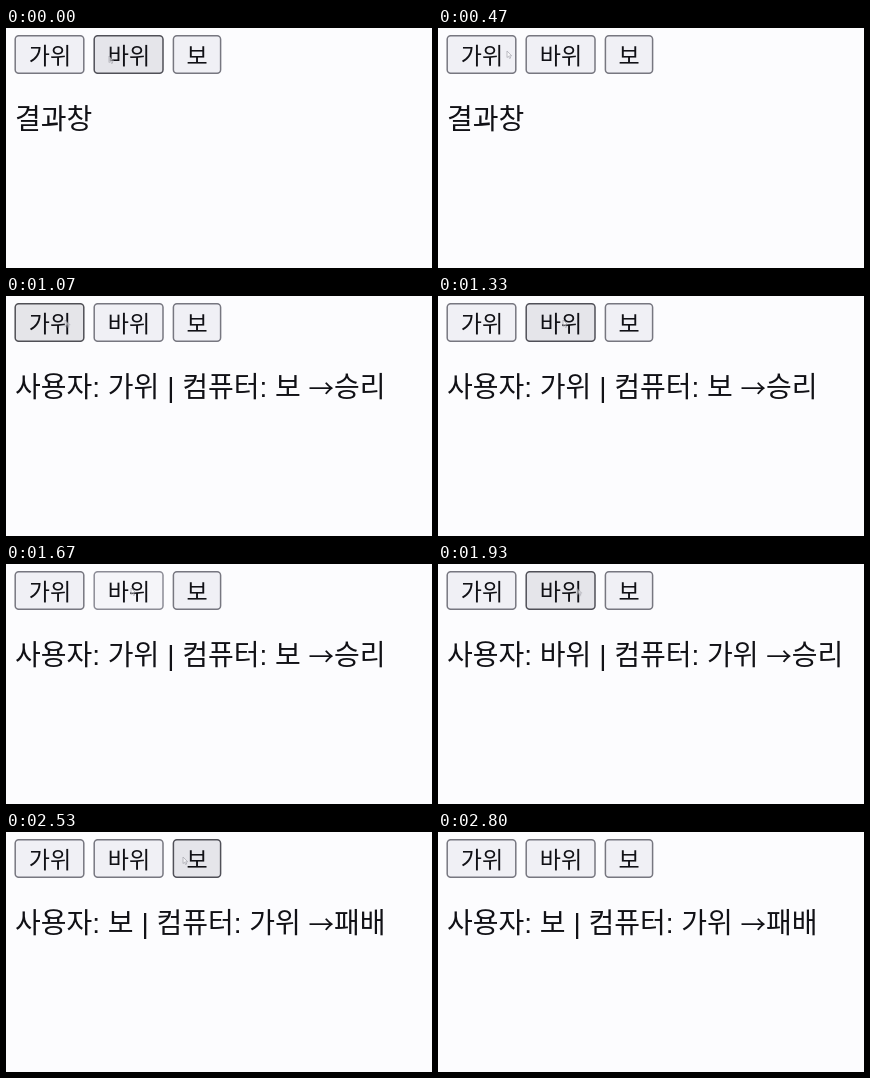
Recreate the animation shown at these times as an HTML page. Size 426 by 240 pixels, loop 2870 ms.

```html
<!DOCTYPE html>
<html lang="ko">
<head>
<meta charset="utf-8">
<title>가위바위보</title>
<style>
  html, body { margin: 0; width: 100%; height: 100%; overflow: hidden; background: #fcfcfe; }
  svg { display: block; width: 426px; height: 240px; }
  text { font-family: "Liberation Sans", "Noto Sans CJK KR", "Noto Sans CJK", sans-serif; fill: #111116; }
  rect { fill: #f0f0f5; stroke: #777780; stroke-width: 1.5; }
  .label { font-size: 23px; text-anchor: middle; }
  .result { font-size: 28px; opacity: 0; }
  .arrow { font: 25.5px "Noto Sans CJK KR", "Noto Sans CJK", sans-serif; }

  rect, .result, .cursor, .cursor path { animation: 2870ms step-end infinite; }
  .scissors { animation-name: scissors; }
  .rock { animation-name: rock; }
  .paper { animation-name: paper; }
  .idle { animation-name: idle; }
  .first { animation-name: first; }
  .second { animation-name: second; }
  .third { animation-name: third; }
  .cursor { animation-name: move; animation-timing-function: ease-in-out; }
  .cursor path { animation-name: show; fill: #fff; stroke: #85858e; stroke-width: .8; opacity: .6; }

  /* Button states: normal, hover, pressed */
  @keyframes scissors {
    0%, 39.37%, 100% { fill: #f0f0f5; stroke: #777780; }
    18.47%, 34.84% { fill: #e5e5e9; stroke: #505056; }
    32.4% { fill: #f5f5f9; stroke: #8c8c96; }
  }
  @keyframes rock {
    0%, 41.81%, 60.63%, 100% { fill: #e5e5ea; stroke: #505058; }
    4.53%, 69.69% { fill: #f0f0f5; stroke: #777780; }
    58.01% { fill: #f5f5f9; stroke: #8c8c96; }
  }
  @keyframes paper {
    0%, 95.12%, 100% { fill: #f0f0f5; stroke: #777780; }
    74.22%, 88.15% { fill: #e5e5ea; stroke: #505058; }
    85.71% { fill: #f5f5f9; stroke: #8c8c96; }
  }

  @keyframes idle { 0% { opacity: 1; } 34.84%, 100% { opacity: 0; } }
  @keyframes first { 0%, 60.63%, 100% { opacity: 0; } 34.84% { opacity: 1; } }
  @keyframes second { 0%, 88.15%, 100% { opacity: 0; } 60.63% { opacity: 1; } }
  @keyframes third { 0% { opacity: 0; } 88.15%, 100% { opacity: 1; } }

  @keyframes move {
    0%, 100% { transform: translate(103px, 28px); }
    16.38% { transform: translate(69px, 23px); }
    27.87%, 36% { transform: translate(57px, 24px); }
    46.34%, 62% { transform: translate(125px, 24px); }
    76.66%, 89% { transform: translate(177px, 25px); }
    95.12% { transform: translate(190px, 48px); }
  }
  @keyframes show { 0%, 100% { opacity: .6; } 95.12% { opacity: 0; } }
</style>
</head>
<body>
<svg viewBox="0 0 426 240">
  <rect class="scissors" x="9.2" y="7.7" width="68.6" height="37.5" rx="3.5"/>
  <rect class="rock" x="88.2" y="7.7" width="68.8" height="37.5" rx="3.5"/>
  <rect class="paper" x="167.4" y="7.7" width="47.2" height="37.5" rx="3.5"/>
  <text class="label" x="43.9" y="36">가위</text>
  <text class="label" x="122.9" y="36">바위</text>
  <text class="label" x="191.1" y="36">보</text>

  <text class="result idle" x="9" y="101">결과창</text>
  <text class="result first" x="9" y="101">사용자: 가위 | 컴퓨터: 보 <tspan class="arrow" dy="1">→</tspan><tspan dy="-1">승리</tspan></text>
  <text class="result second" x="9" y="101">사용자: 바위 | 컴퓨터: 가위 <tspan class="arrow" dy="1">→</tspan><tspan dy="-1">승리</tspan></text>
  <text class="result third" x="9" y="101">사용자: 보 | 컴퓨터: 가위 <tspan class="arrow" dy="1">→</tspan><tspan dy="-1">패배</tspan></text>

  <g class="cursor"><path d="M0 0V6.5L1.6 5.2 2.6 7.5 3.7 7 2.7 4.8H4.7Z"/></g>
</svg>
</body>
</html>
```
